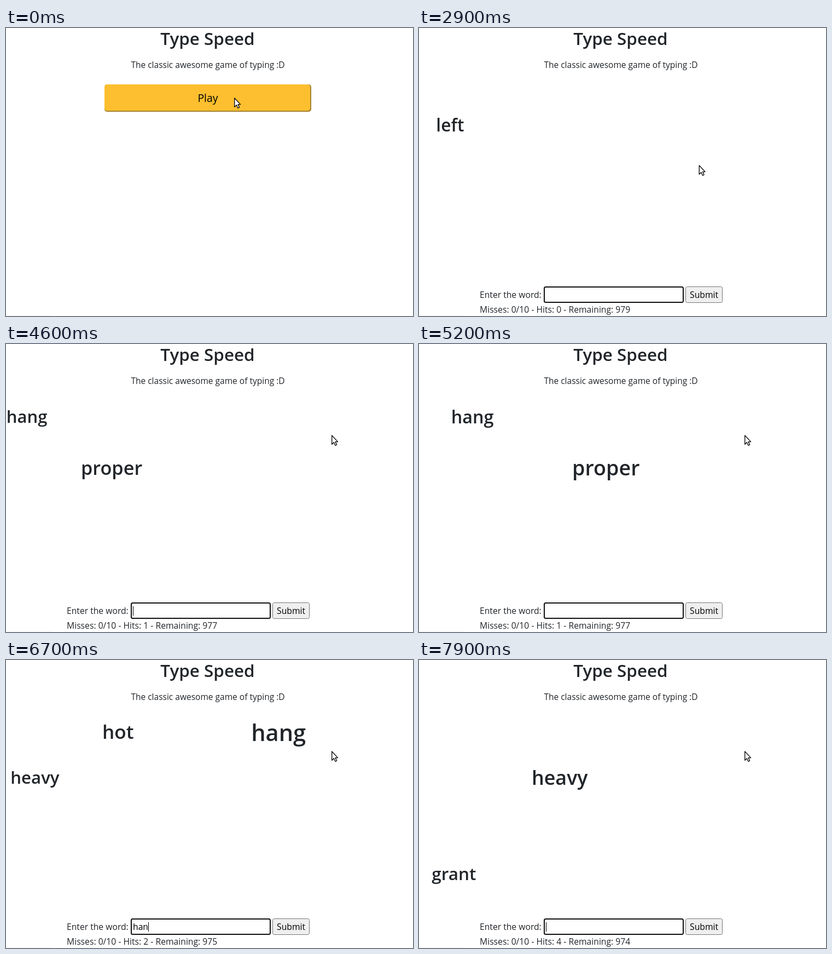
An HTML page with a canvas that plays this animation: 744x526 px, repeating every 8 s.

```html
<!DOCTYPE html>
<html lang="en">
<head>
<meta charset="utf-8">
<title>Type Speed</title>
<style>
  html, body { margin: 0; width: 100%; height: 100%; overflow: hidden; background: #fff; }
  canvas { display: block; }
</style>
</head>
<body>
<canvas id="stage" width="744" height="526"></canvas>
<script>
const ctx = document.getElementById('stage').getContext('2d');
const WIDTH = 744, HEIGHT = 526, LOOP = 8000, STEP = 100;
const INK = '#212529', WORD_SIZE = 31, GROWTH = 0.55;

// Times in seconds: word appears, travel time, first key, Enter.
const words = [
  { text: 'left',   y: 176.8, start: 2.41, travel: 3,    key: 4.1, enter: 4.6 },
  { text: 'proper', y: 226.5, start: 3.44, travel: 3.1,  key: 5.4, enter: 6.0 },
  { text: 'hang',   y: 132.5, start: 4.53, travel: 2.9,  key: 6.5, enter: 6.9 },
  { text: 'hot',    y: 130.5, start: 5.46, travel: 2.9,  key: 7.5, enter: 7.9 },
  { text: 'heavy',  y: 214.5, start: 6.45, travel: 3.07, key: 99,  enter: 99 },
  { text: 'grant',  y: 390.5, start: 7.48, travel: 3,    key: 99,  enter: 99 }
];

// Pointer stops: time, x, y.
const pointerPath = [
  [0, 417, 127], [0.5, 417, 127], [0.7, 384, 126], [1.3, 384, 126],
  [1.8, 261, 502], [2.3, 261, 502], [3.1, 595, 166], [8, 595, 166]
];

const clamp = v => Math.max(0, Math.min(1, v));

// Same curve as the CSS "ease-in" keyword.
function easeIn(x) {
  let low = 0, high = 1;
  for (let i = 0; i < 24; i++) {
    const s = (low + high) / 2;
    if (1.26 * s + 0.48 * s * s - 0.74 * s ** 3 < x) low = s; else high = s;
  }
  return low * low * (3 - 2 * low);
}

function label(text, x, y, size = 15.7, { color = INK, weight = 400, align = 'left' } = {}) {
  ctx.font = `${weight} ${size}px "Open Sans", "Noto Sans", sans-serif`;
  ctx.textAlign = align;
  ctx.fillStyle = color;
  ctx.fillText(text, x, y);
}

function box(x, y, w, h, radius, fill, stroke, line = 1) {
  ctx.beginPath();
  ctx.roundRect(x, y, w, h, radius);
  ctx.fillStyle = fill;
  ctx.fill();
  if (!stroke) return;
  ctx.strokeStyle = stroke;
  ctx.lineWidth = line;
  ctx.stroke();
}

function drawPlay(t) {
  const pressed = t >= 0.2;
  box(180, 103, 378, 50, 5, '#a5832f');
  box(pressed ? 182 : 180, 103, 376, pressed ? 50 : 48, 5, '#fdbf2f');
  label('Play', 369, 135, 19.4, { color: '#000', align: 'center' });
}

function drawWord({ text, y, start, travel, enter }, t) {
  if (t < start || t >= enter) return;
  const p = easeIn(clamp((t - start) / travel));
  const scale = 1 + GROWTH * p;
  ctx.font = `600 ${WORD_SIZE}px "Open Sans", "Noto Sans", sans-serif`;
  const center = ctx.measureText(text).width / 2 + WIDTH * p;
  label(text, center, y + 11.5 * scale, WORD_SIZE * scale, { weight: 600, align: 'center' });
}

function drawForm(t) {
  const focused = t >= 2.1;
  label('Enter the word:', 111, 493);
  if (focused) box(229, 473, 254, 28, 2.5, '#fff', '#101010', 2);
  else box(228.5, 472.5, 255, 29, 2, '#fff', t < 1.7 ? '#767676' : '#4f4f4f');
  box(487.5, 472.5, 67, 29, 3, '#efefef', '#767676');
  label('Submit', 521, 493, 15.7, { color: '#000', align: 'center' });

  const active = words.find(w => t >= w.key && t < w.enter);
  const typed = active ? active.text.slice(0, Math.floor((t - active.key) * 10 + 1.01)) : '';
  label(typed, 232, 493, 15.7, { color: '#000' });
  const lastKey = Math.max(2.1, ...words.flatMap(w => [w.key, w.enter]).filter(k => k <= t));
  if (focused && (active || (t - lastKey) % 1.2 < 0.6)) {
    ctx.fillRect(Math.round(232 + ctx.measureText(typed).width), 479, 1, 17);
  }

  const hits = words.filter(w => t >= w.enter).length;
  const remaining = 980 - words.filter(w => t >= w.start).length;
  label(`Misses: 0/10 - Hits: ${hits} - Remaining: ${remaining}`, 111, 520);
}

function drawPointer(t) {
  const i = pointerPath.findIndex(stop => stop[0] > t);
  const [t0, x0, y0] = pointerPath[i - 1], [t1, x1, y1] = pointerPath[i];
  const p = (t - t0) / (t1 - t0);
  const x = x0 + (x1 - x0) * p, y = y0 + (y1 - y0) * p;
  ctx.save();
  ctx.translate(x, y);
  ctx.lineJoin = 'round';
  const overInput = t > 1 && x > 228 && x < 484 && y > 472;
  const shape = new Path2D(overInput
    ? 'M-3.5 -7.5H-1L0 -6.5L1 -7.5H3.5M0 -6.5V6.5M-3.5 7.5H-1L0 6.5L1 7.5H3.5'
    : 'M.7 1V17.2L4.3 13.8L7 19.3L9.6 18L7 12.6H11.6Z');
  if (overInput) {
    ctx.strokeStyle = '#fff';
    ctx.lineWidth = 4;
    ctx.stroke(shape);
  } else {
    ctx.fillStyle = '#fff';
    ctx.fill(shape);
  }
  ctx.strokeStyle = '#000';
  ctx.lineWidth = overInput ? 1.7 : 1.3;
  ctx.stroke(shape);
  ctx.restore();
}

function draw(now) {
  const t = Math.floor((now % LOOP) / STEP + 0.001) * STEP / 1000 % (LOOP / 1000);
  ctx.fillStyle = '#fff';
  ctx.fillRect(0, 0, WIDTH, HEIGHT);
  ctx.fillStyle = '#f4f4f4';
  ctx.fillRect(0, 525, 85, 1);
  label('Type Speed', 368.5, 31, 31.4, { weight: 600, align: 'center' });
  label('The classic awesome game of typing :D', 369, 73, 15.5, { align: 'center' });
  if (t < 1.1) drawPlay(t);
  else {
    words.forEach(word => drawWord(word, t));
    drawForm(t);
  }
  drawPointer(t);
}

const began = performance.now();
function tick() {
  draw(performance.now() - began);
  requestAnimationFrame(tick);
}
tick();
</script>
</body>
</html>
```
